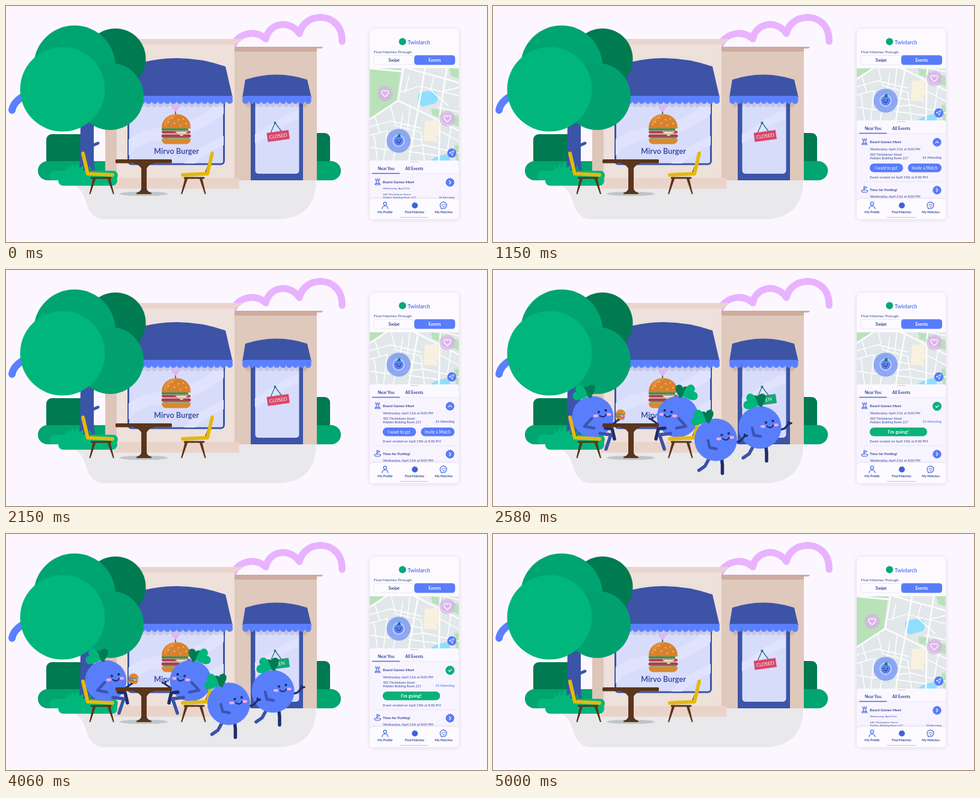
Write an HTML page that moves like this. It is 800x394 px and loops after 5030 ms.

```html
<!DOCTYPE html>
<html lang="en">
<head>
<meta charset="utf-8">
<title>Burger place and event app</title>
<style>
html, body { margin: 0; height: 100%; overflow: hidden; background: #fcf7ff; }
svg { display: block; width: 100vw; height: 100vh; --open: 0; --going: 0; }
text { font-family: Lato, "Open Sans", sans-serif; fill: #34489e; }
.b { font-weight: 700; }
.m { text-anchor: middle; }
.w { fill: #fff; }
.line { fill: none; stroke-linecap: round; stroke-linejoin: round; }
.open { opacity: var(--open); }
.shut { opacity: calc(1 - var(--open)); }
.going { opacity: var(--going); }
.ask { opacity: calc(1 - var(--going)); }
#scroll { transform: translateY(calc(var(--open) * -67px)); }
#chevron { transform: translate(738.5px, 294.5px) rotate(calc(var(--open) * -90deg)); }
#phone { filter: drop-shadow(0 1px 4px rgba(70, 50, 110, .16)); }
#nav { filter: drop-shadow(0 -1px 2px rgba(70, 50, 110, .1)); }
</style>
</head>
<body>
<svg id="stage" viewBox="0 0 800 394">
<defs>
  <clipPath id="phoneClip"><rect x="605" y="38" width="148" height="318" rx="6"/></clipPath>
  <clipPath id="listClip"><rect x="605" y="104" width="148" height="230"/></clipPath>
  <clipPath id="glassClip"><path d="M204 150H362V263H204ZM414 150H487V279H414Z"/></clipPath>

  <path id="heart" d="M0 5.5C-3 3-6 .5-6-2.2A3.2 3.2 0 0 1 0-3.4A3.2 3.2 0 0 1 6-2.2C6 .5 3 3 0 5.5Z"/>

  <g id="burger">
    <path d="M-24 -1C-25-33 25-33 24-1Z" fill="#d9812c"/>
    <path d="M-20 -6C-18-23-6-25 4-24C-8-20-14-14-16-5Z" fill="#e3913a"/>
    <path class="line" d="M-13 -12L-5 -20M-3 -10L6 -17M12 -17L17 -8M7 -6L9 -6" stroke="#fbe0a0" stroke-width="2" stroke-dasharray="0 9"/>
    <path class="line" d="M-22 .5H22" stroke="#418f45" stroke-width="4.5" stroke-dasharray="0 4"/>
    <path class="line" d="M-22 5H22" stroke="#b7354b" stroke-width="4"/>
    <path class="line" d="M-22 11.5H22" stroke="#a33d50" stroke-width="5"/>
    <path d="M-2 4H20L9 12Z" fill="#f0dcc0"/>
    <path class="line" d="M-22 8.3H22" stroke="#dc8c7c" stroke-width="1"/>
    <path class="line" d="M-21 14.5H21" stroke="#58a04c" stroke-width="2.5"/>
    <path d="M-24 16H24C24 22 21 25 16 25H-16C-21 25-24 22-24 16Z" fill="#dd8630"/>
  </g>

  <g id="leaf">
    <path class="line" d="M-3 -33Q-4 -38-9 -39" stroke="#00794f" stroke-width="3"/>
    <use href="#heart" transform="translate(-7 -42) rotate(-15) scale(2)" fill="#007b51"/>
    <use href="#heart" transform="translate(-20 -39) rotate(-68) scale(2.25)" fill="#00b57b"/>
  </g>

  <g id="face">
    <g fill="#f3a9ec"><ellipse cx="5" cy="-1.500" rx="4.200" ry="2.400"/><ellipse cx="26.500" cy="-4" rx="4.200" ry="2.400"/></g>
    <g fill="#1c2a66"><circle cx="10" cy="-8" r="2.100"/><circle cx="21.500" cy="-10.700" r="2.100"/></g>
    <path class="line" d="M11.500 -2Q18 3.500 22.500 -4" stroke="#1c2a66" stroke-width="2"/>
  </g>

  <g id="sitBody">
    <circle cx="166" cy="245" r="34.500" fill="#587efc"/>
    <use href="#face" x="166" y="245"/>
    <use href="#leaf" x="166" y="245"/>
    <path class="line" d="M164 248L152 261L168 264" stroke="#3b54ae" stroke-width="4.500"/>
  </g>
  <g id="sitLegs" class="line" stroke-width="5.500">
    <path d="M187 264L198 265L202 282" stroke="#1f2d6c"/>
    <path d="M178 273L196 275L188 299" stroke="#3b51aa"/>
    <path d="M199 257L209 250M209 250L207 246M209 250L213 248" stroke="#1f2d6c" stroke-width="3"/>
  </g>

  <g id="walker" class="line" stroke-width="5.500">
    <path d="M-12 33L-18 44L-28 51" stroke="#3b51aa"/>
    <path d="M10 33L11 42V56" stroke="#1f2d6c"/>
    <path d="M34 4L41 2L48 -6M48 -6V-9M48 -6L52 -7" stroke="#1f2d6c" stroke-width="3.400"/>
    <circle r="35.500" fill="#587efc"/>
    <use href="#face"/>
    <path d="M-13 1L-10 13L1 15" stroke="#3b54ae" stroke-width="4.500"/>
  </g>

  <g id="chair">
    <path class="line" d="M142 287H174" stroke="#59351d" stroke-width="3"/>
    <path d="M145 286H150L140.500 314H138.500ZM168 286H173L180 314H178Z" fill="#59351d"/>
    <path class="line" d="M133 262L139 277" stroke="#59351d" stroke-width="1.500"/>
    <path class="line" d="M128 246L136 280L177 282" stroke="#e2ba0d" stroke-width="6"/>
  </g>

  <g id="sign">
    <path class="line" d="M440 212L447.500 195L458 209" stroke="#286e87" stroke-width="1.300"/>
    <circle cx="447.500" cy="195" r="2" fill="#286e87"/>
  </g>

  <g id="mapHeart">
    <circle r="13" fill="#d3b1e3" opacity=".65"/>
    <circle r="9" fill="#e2acf2" opacity=".65"/>
    <use href="#heart" class="line" stroke="#fff" stroke-width="1.400"/>
  </g>
</defs>

<rect width="800" height="394" fill="#fcf7ff"/>
<rect y="393" width="800" height="1" fill="#fff"/>

<!-- cloud, ground and bushes -->
<path class="line" d="M376 70C384 44 416 39 432 55C437 29 471 21 488 46C496 8 560 8 559 59" stroke="#e8b2ff" stroke-width="11.500"/>
<path d="M108 298C134 304 130 334 143 347Q150 356 166 356H450C500 356 516 325 516 291H108Z" fill="#e9e8ea"/>
<g fill="#007a50"><rect x="67" y="214" width="76" height="60" rx="9"/><rect x="490" y="212" width="49" height="60" rx="9"/></g>
<g fill="#00a570"><rect x="53" y="259" width="150" height="32" rx="16"/><rect x="480" y="259" width="77" height="32" rx="16"/></g>

<!-- buildings -->
<path d="M165 150H190V291H165Z" fill="#dec5b9"/>
<path d="M380 75H517V291H380Z" fill="#dfc8bc"/>
<path d="M380 68H527L525 71H517V76H380Z" fill="#ccab9d"/>
<path d="M184 60H380V290H184Z" fill="#eee0da"/>
<path d="M184 55H392V58L380 64H184Z" fill="#ead4cb"/>
<path d="M180 287H388V305H180Z" fill="#ead4ca"/>

<!-- window and door -->
<rect x="203.500" y="140" width="159" height="124" rx="5" fill="#d8dcfb" stroke="#3c55a8" stroke-width="3"/>
<path d="M407 152H494V291H407Z" fill="#3c55a8"/>
<rect x="414.500" y="140" width="73" height="140" rx="5" fill="#d8dcfb"/>
<g clip-path="url(#glassClip)" class="line" stroke="#dfe3fd">
  <path d="M200 240C240 195 285 235 365 165" stroke-width="20"/>
  <path d="M300 270C320 240 345 235 370 220M405 225C440 215 455 185 495 180" stroke-width="14"/>
</g>
<g fill="#42366f" opacity=".13">
  <path d="M202 155H366V164H202ZM398 155H506V164H398Z"/>
  <path class="line" d="M205 164H362M403 164H503" stroke="#42366f" stroke-width="10" stroke-dasharray="0 10.400"/>
</g>
<path d="M204 101Q284 73 365 101L377 153H190ZM398 123Q450 106 501 123L508 153H393Z" fill="#3c53a6"/>
<path d="M190.500 150H376.500V158H190.500ZM393.500 150H507.500V158H393.500Z" fill="#5b80ff"/>
<path class="line" d="M195.500 158H372M398.500 158H503" stroke="#5b80ff" stroke-width="10.600" stroke-dasharray="0 10.380"/>

<!-- shop window burger -->
<path d="M282 181V174" stroke="#28876a" stroke-width="2"/>
<path class="line" d="M282 175L277 169M282 175L280 167M282 175L284 167M282 175L287 169" stroke="#e5aef7" stroke-width="2.600"/>
<use href="#burger" x="283" y="205.500"/>
<text x="283.500" y="247" class="b m" font-size="12.700" style="fill:#3c51a3">Mirvo Burger</text>

<!-- door sign -->
<use href="#sign"/>
<g transform="translate(452.700 217) rotate(-8)">
  <rect x="-18.300" y="-7.500" width="36.600" height="15" fill="#d8476a"/>
  <text y="2.800" class="m w" font-size="7.800" style="fill:#fff">CLOSED</text>
  <g class="going">
    <rect x="-18.300" y="-7.500" width="36.600" height="15" fill="#12a878"/>
    <text y="2.800" class="m w" font-size="8.200" style="fill:#fff">OPEN</text>
  </g>
</g>

<!-- tree -->
<path class="line" d="M10 174Q12 161 28 151" stroke="#5a80ff" stroke-width="12"/>
<path class="line" d="M144 233L153 229" stroke="#3b54a8" stroke-width="5"/>
<path d="M124 190H146V258L148 275H142L140 266L136 275H130L123 268Z" fill="#3b54a8"/>
<path d="M101 277L103 267L108 271L110 262L114 270L119 260L121 272L129 266L128 277Z" fill="#00b67b"/>
<rect x="73" y="275" width="113" height="16" rx="8" fill="#00b67b"/>
<rect x="87" y="282" width="98" height="18" rx="8" fill="#00b67b"/>
<circle cx="182" cy="88" r="50.500" fill="#007a50"/>
<circle cx="114" cy="100.500" r="68" fill="#00a471"/>
<circle cx="173" cy="151" r="56" fill="#00a16f"/>
<circle cx="94" cy="139" r="70.500" fill="#00b67b"/>

<!-- seats and guests -->
<g class="going">
  <use href="#sitBody"/>
  <use href="#sitBody" transform="translate(473) scale(-1 1)"/>
</g>
<ellipse cx="229" cy="313.500" rx="40" ry="3.600" fill="#bfc5c9"/>
<use href="#chair"/>
<use href="#chair" transform="translate(471) scale(-1 1)"/>
<g class="going">
  <use href="#sitLegs"/>
  <use href="#sitLegs" transform="translate(473) scale(-1 1)"/>
  <use href="#burger" transform="translate(212 241) rotate(12) scale(.33)"/>
</g>
<path d="M205 261H252Q236 264 234 272V305Q235 310 242 312V314H217V312Q224 310 225 305V272Q223 264 205 261Z" fill="#59351d"/>
<rect x="182" y="256" width="94" height="6.500" rx="2" fill="#59351d"/>
<g class="going">
  <use href="#walker" x="444" y="262.700"/>
  <use href="#leaf" x="450" y="260"/>
  <use href="#walker" x="370.500" y="283.500"/>
  <use href="#leaf" x="363" y="287"/>
</g>

<!-- phone -->
<rect id="phone" x="605" y="38" width="148" height="318" rx="6" fill="#fdfaff"/>
<g clip-path="url(#phoneClip)">
  <circle cx="659.500" cy="59.500" r="6" fill="#08a878"/>
  <text x="668" y="64" font-size="8.700" class="b" style="fill:#5b7df3">Twinlarch</text>
  <text x="612" y="79" font-size="6.400">Find Matches Through</text>
  <rect x="611.500" y="82.500" width="135" height="15.500" rx="4.500" fill="#fdfbff" stroke="#e6e1ef" stroke-width=".8"/>
  <rect x="679" y="82.300" width="68" height="16" rx="4.500" fill="#587cfb"/>
  <text x="645.500" y="92.800" font-size="6.900" class="b m">Swipe</text>
  <text x="713" y="92.800" font-size="6.900" class="b m w">Events</text>

  <g clip-path="url(#listClip)"><g id="scroll">
    <path d="M605 104H753V262H605Z" fill="#e2e7ea"/>
    <path d="M605 104H657L650 157L628 174L605 187ZM737 104H753V121L741 117ZM707 171L726 174L724 187L709 182ZM737 180L753 184V202L741 196ZM746 232H753V258H748Z" fill="#b9e2b9"/>
    <path d="M686 147Q700 140 714 143Q718 146 718 155Q718 163 708 164L693 168Q688 167 685 154ZM707 258Q713 250 738 247V262H707Z" fill="#90defd"/>
    <path d="M697 192L719 190L720 215L715 217L718 227L694 225Z" fill="#f8f1df"/>
    <g class="line" stroke="#fbfcfd">
      <path d="M661 104L652 158L605 189M652 158L690 176L753 208M605 104L657 109M668 104L753 128M697 104L684 180L670 258M733 104L722 178L720 258" stroke-width="2.800"/>
      <path d="M605 202L640 192L690 204M605 216L634 208L628 258M614 186L622 212M640 168L648 200L690 211L696 258M605 236L634 240L694 232L753 246M612 214L618 258M655 144L688 134L753 150M670 117L664 144M712 118L706 140L735 166M728 142L753 136M660 180L656 205M672 168L668 206M720 208L753 226M740 203L734 242M673 220L692 224M670 243L720 250M648 236L644 258M719 169L753 177" stroke-width="1.800"/>
    </g>
    <use href="#mapHeart" x="630.500" y="146"/>
    <use href="#mapHeart" x="734" y="188"/>
    <circle cx="653" cy="225" r="20" fill="#7798f4" opacity=".8"/>
    <circle cx="653" cy="225" r="9.300" fill="#7c9bf8" stroke="#e3eaff" stroke-width="1.200"/>
    <circle cx="653" cy="225.500" r="7.200" fill="#5b81fa"/>
    <path class="line" d="M650 227.500Q653 230 656 227.500" stroke="#1c2a66" stroke-width="1"/>
    <g fill="#1c2a66"><circle cx="650" cy="224.500" r="1"/><circle cx="656" cy="224.500" r="1"/></g>
    <use href="#heart" transform="translate(654 217) rotate(-40) scale(.5)" fill="#087f66"/>
    <circle cx="741.500" cy="245.500" r="7.700" fill="#587cfb"/>
    <path class="line" d="M737.500 245L745 241.500L742 249.500L740.800 246.200Z" stroke="#fff" stroke-width=".9"/>

    <path d="M605 262Q605 258 609 258H749Q753 258 753 262V430H605Z" fill="#fbf8ff"/>
    <rect x="672" y="259.500" width="14" height="1.600" rx=".8" fill="#dcd8e4"/>
    <path d="M605 280H753V430H605Z" fill="#f8f4ff"/>
    <path d="M605 279.700H753" stroke="#e7e2f2" stroke-width=".8"/>
    <path d="M609 279.500H655" stroke="#4867d6" stroke-width="1.400"/>
    <text x="632" y="274.200" font-size="6.900" class="b m">Near You</text>
    <text x="679" y="274.200" font-size="6.800" class="b m">All Events</text>

    <path class="line" d="M615 288V291H621V288M618 288V291M616.500 291L615.500 296H620.500L619.500 291M614 298.500V296.500H622V298.500Z" stroke="#4867d6" stroke-width="1.200"/>
    <text x="626.700" y="295.500" font-size="6.100" class="b">Board Games Meet</text>
    <circle cx="738.500" cy="294.500" r="7.200" fill="#587cfb"/>
    <path id="chevron" class="line ask" d="M-1.200 -2.500L1.400 0L-1.200 2.500" stroke="#fff" stroke-width="1.200"/>

    <g class="shut" font-size="4.550">
      <text x="627" y="306">Wednesday, April 21st</text>
      <text x="627" y="315.700">482 Thistledown Street</text>
      <text x="627" y="321">Pebbles Building Room 217</text>
      <text x="746" y="321" text-anchor="end">24 Attending</text>
    </g>
    <g class="open" font-size="5.600">
      <text x="627" y="307.500">Wednesday, April 21st at 8:00 PM</text>
      <text x="627" y="316.800" font-size="5.200">482 Thistledown Street</text>
      <text x="627" y="323" font-size="5.300">Pebbles Building Room 217</text>
      <text x="627" y="355">Event created on April 15th at 8:00 PM</text>
      <g class="ask">
        <text x="746" y="322.300" text-anchor="end">24 Attending</text>
        <rect x="626.500" y="330" width="55.500" height="14.500" rx="7.200" fill="#587cfb"/>
        <rect x="690" y="330" width="56" height="14.500" rx="7.200" fill="#587cfb"/>
        <text x="654" y="339.500" font-size="6.800" class="m w">I want to go!</text>
        <text x="718" y="339.500" font-size="6.800" class="m w">Invite a Match</text>
      </g>
    </g>
    <g class="going">
      <text x="746" y="322.300" font-size="5.600" text-anchor="end" style="fill:#4b6fe8">25 Attending</text>
      <rect x="626.500" y="330" width="95.500" height="14.500" rx="7.200" fill="#0bb07b"/>
      <text x="674" y="340" font-size="8" class="b m w">I'm going!</text>
      <circle cx="738.500" cy="294.500" r="7.400" fill="#0bb07b"/>
      <path class="line" d="M736 294.700L737.800 296.500L741.200 292.800" stroke="#fff" stroke-width="1.200"/>
    </g>

    <path d="M611 360H747" stroke="#e5e0f1" stroke-width=".8"/>
    <path class="line" d="M617 375V368L622 370L617 372M613 375Q612 378 618 378Q624 378 623 375Q618 373 613 375" stroke="#4867d6" stroke-width="1.200"/>
    <text x="626.700" y="375.700" font-size="6.100" class="b">Time for Putting!</text>
    <circle cx="738.500" cy="374.500" r="7.200" fill="#587cfb"/>
    <path class="line" d="M737.300 372L739.900 374.500L737.300 377" stroke="#fff" stroke-width="1.200"/>
    <text x="627" y="387" font-size="5.600">Wednesday, April 21st at 8:00 PM</text>
  </g></g>

  <path id="nav" d="M605 356V328Q605 322 611 322H747Q753 322 753 328V356Z" fill="#fdfbff"/>
  <g class="line" stroke="#4163d8" stroke-width="1.200">
    <circle cx="630.500" cy="330" r="2.600"/>
    <path d="M625.500 338.500Q626 334 630.500 334Q635 334 635.500 338.500"/>
    <path d="M724 338.500L723.500 336.500A5.500 5.500 0 1 1 726 338Z"/>
    <use href="#heart" transform="translate(728 333.300) scale(.45)" stroke-width="2"/>
  </g>
  <circle cx="680" cy="333" r="5" fill="#4163d8"/>
  <g font-size="5.400" class="b m">
    <text x="630.500" y="346.200">My Profile</text>
    <text x="679.500" y="346.200">Find Matches</text>
    <text x="728" y="346.200">My Matches</text>
  </g>
  <rect x="655" y="352" width="48" height="1.800" rx=".9" fill="#d9d6df"/>
</g>
</svg>
<script>
const LOOP = 5030, FADE = 300;
const style = document.getElementById('stage').style;

// Ease-out progress of a transition that begins at the given time.
function progress(t, begin) {
  const p = Math.min(1, Math.max(0, (t - begin) / FADE));
  return 1 - (1 - p) ** 3;
}

function draw(now) {
  const t = now % LOOP;
  const left = 1 - progress(t, 4680);
  style.setProperty('--open', progress(t, 800) * left);
  style.setProperty('--going', progress(t, 2220) * left);
  requestAnimationFrame(draw);
}
requestAnimationFrame(draw);
</script>
</body>
</html>
```
